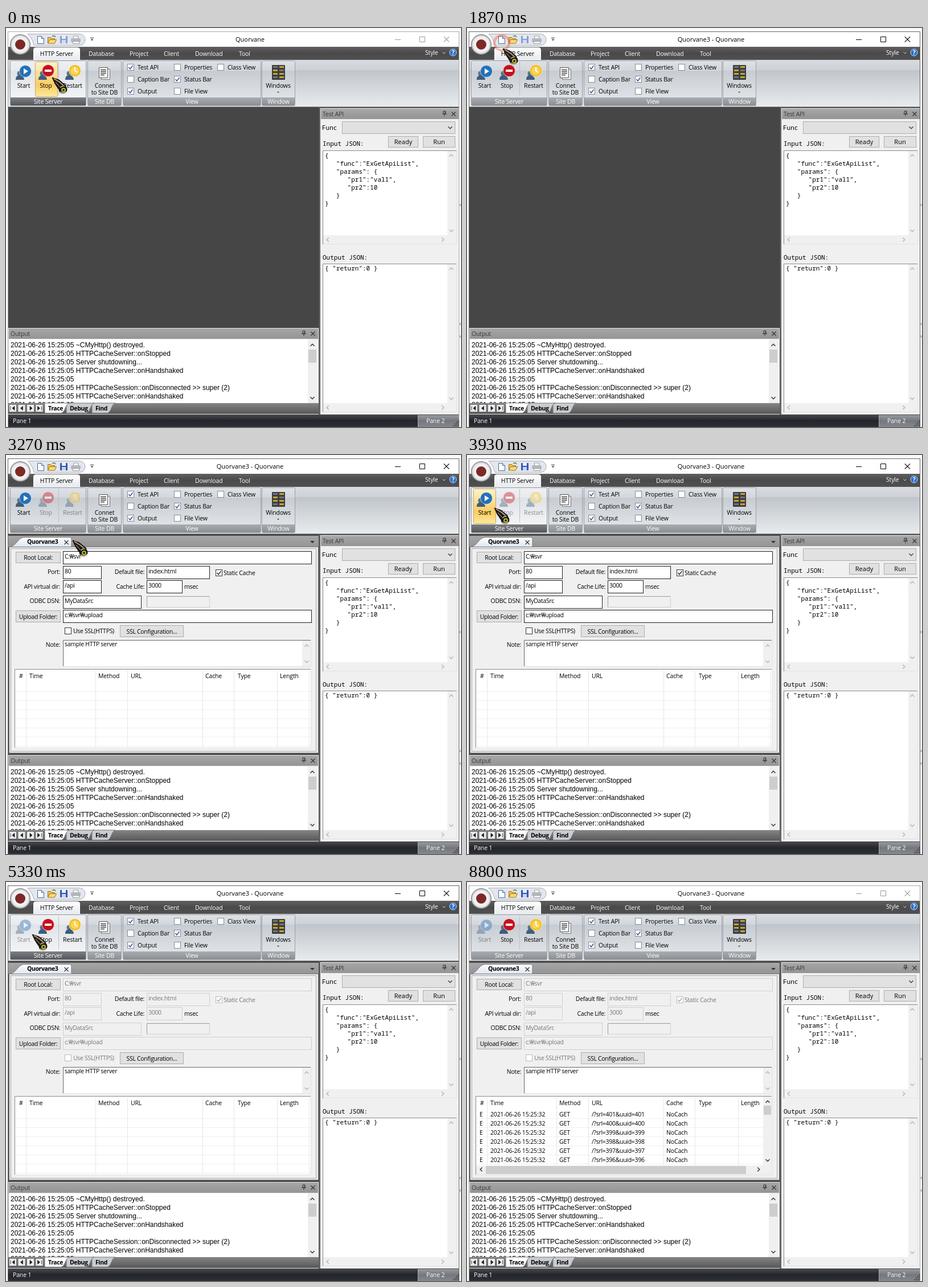
These frames come from a looping animation (799x701 px, 9 s). An HTML page:

```html
<!DOCTYPE html>
<html lang="en">
<head>
<meta charset="utf-8">
<title>Server manager</title>
<style>
html, body { margin: 0; width: 100%; height: 100%; overflow: hidden; background: #fff; }
svg { display: block; width: 100%; height: 100%; }
text { font: 10.5px "Open Sans", "Noto Sans", sans-serif; letter-spacing: -.15px; fill: #000; white-space: pre; }
.f { letter-spacing: -.3px; }
.s { font-size: 11px; letter-spacing: 0; }
.m { font: 11px "Noto Sans Mono", "DejaVu Sans Mono", monospace; letter-spacing: 0; }
.a { font: 12px "Liberation Sans", Arial, sans-serif; letter-spacing: 0; }
.b { font-weight: 700; letter-spacing: -.4px; }
.w { fill: #fff; }
.g { fill: #383838; }
.c { text-anchor: middle; }
.e { text-anchor: end; }
.edit { fill: #fff; stroke: #222; }
.off .edit { fill: #f0f0f0; stroke: #cfcfcf; }
.off .val { fill: #777; }
.off .box { stroke: #bbb; }
.off .tick { stroke: #aaa; }
.bare .soft { stroke: none; }
#options .box { stroke: #868c96; }
#options .tick { stroke: #41539a; }
</style>
</head>
<body>
<svg id="stage" viewBox="0 0 799 701" preserveAspectRatio="none"></svg>
<script>
const LOOP = 9000, STEP = 200 / 3;
const APP = "Quorvane", DOC = APP + "3";

// Markup helpers
const text = (x, y, s, cls = "") =>
  `<text x="${x}" y="${y}" class="${cls}">${s.replace(/&/g, "&amp;").replace(/>/g, "&gt;")}</text>`;
const rect = (x, y, w, h, fill, more = "") =>
  `<rect x="${x}" y="${y}" width="${w}" height="${h}" fill="${fill}" ${more}/>`;
const frame = (x, y, w, h, fill, stroke, more = "") =>
  rect(x + .5, y + .5, w - 1, h - 1, fill, `stroke="${stroke}" ${more}`);
const path = (d, fill, stroke = "none", w = 1, more = "") =>
  `<path d="${d}" fill="${fill}" stroke="${stroke}" stroke-width="${w}" ${more}/>`;
const line = (d, stroke, w = 1, more = "") => path(d, "none", stroke, w, more);
const disc = (x, y, r, fill, more = "") => `<circle cx="${x}" cy="${y}" r="${r}" fill="${fill}" ${more}/>`;
const group = (id, body) => `<g id="${id}">${body}</g>`;
const grad = (id, ...stops) =>
  `<linearGradient id="${id}" x2="0" y2="1">${stops.map((c, i) =>
    `<stop offset="${i / (stops.length - 1)}" stop-color="${c}"/>`).join("")}</linearGradient>`;
// Glossy: a short upper band, then a longer lower one
const gloss = (id, a, b, c, d) =>
  `<linearGradient id="${id}" x2="0" y2="1">${[[0, a], [.22, b], [.22, c], [1, d]].map(([o, col]) =>
    `<stop offset="${o}" stop-color="${col}"/>`).join("")}</linearGradient>`;

// Small widgets
const cross = (x, y, r, col = "#333", w = 1.2) =>
  line(`M${x - r} ${y - r}l${2 * r} ${2 * r}m0 ${-2 * r}l${-2 * r} ${2 * r}`, col, w);
const pin = (x, y) => line(`M${x - 2} ${y - 4}h4v5h-4zm-2 5h8m-4 0v4m1 -8v3`, "#333");
const arrow = (x, y, r = 3, col = "#333") => path(`M${x - r} ${y - r / 2}h${2 * r}l${-r} ${r}z`, col);
const turns = { up: 180, down: 0, left: 90, right: -90 };
const chevron = (x, y, dir, col = "#b5b5b5") =>
  line("M-3.5 -1.8L0 1.8L3.5 -1.8", col, 1.4, `transform="translate(${x} ${y}) rotate(${turns[dir]})"`);
const button = (x, y, w, h, label, cls = "f") =>
  frame(x, y, w, h, "#e1e1e1", "#adadad") + text(x + w / 2, y + h / 2 + 4, label, "c " + cls);
const check = (x, y, on) => frame(x - 6, y - 6, 12, 12, "#fff", "#333", 'class="box"') +
  (on ? line(`M${x - 3.5} ${y}l2.5 3l4.5 -6`, "#333", 1.5, 'class="tick"') : "");
const caption = (x, y, w, s) => rect(x, y, w, 18, "url(#cap)") + text(x + 3, y + 13, s, "g") +
  pin(x + w - 25, y + 8) + cross(x + w - 9, y + 9, 3.5);

const defs = `<defs>
  ${grad("cap", "#a6a6a6", "#949494")}
  ${grad("bar", "#606060", "#4a4a4a", "#505050")}
  ${gloss("ribbon", "#d8dbe0", "#cdd1d7", "#c0c5cc", "#e8ecee")}
  ${gloss("grp", "#dee1e5", "#d3d7dc", "#c7ccd2", "#e6e9ec")}
  ${gloss("grpHot", "#eef0f2", "#e8eaed", "#dfe2e6", "#f8f9fa")}
  ${grad("foot", "#a9acb0", "#8b8e92")}
  ${grad("footHot", "#7c7f83", "#55585b")}
  ${grad("hot", "#fdf1cb", "#fce19a", "#f9cd62", "#fdea9f")}
  ${grad("tab", "#ffffff", "#e6e9ee")}
  ${grad("doctab", "#ffffff", "#dde6f2")}
  ${grad("status", "#484a4e", "#24262b", "#2c2f34")}
  ${grad("pane", "#97999e", "#74777d", "#85888d")}
  ${grad("dock", "#858585", "#575757")}
  <radialGradient id="orb"><stop offset="0" stop-color="#fff"/><stop offset=".8" stop-color="#eeeeef"/><stop offset="1" stop-color="#aaacb1"/></radialGradient>
  <clipPath id="log"><rect x="5" y="547" width="525" height="112"/></clipPath>
</defs>`;

function titleBar() {
  return rect(0, 0, 799, 701, "#fafafa") + rect(3, 6, 793, 695, "#5a5a5a") + rect(4, 7, 791, 27, "#fff") +
    path("M3.5 701V6.5H795.5V701", "none", "#999", 1, 'id="edge"') +
    `<text id="title" x="428.5" y="24" class="s c"></text>` +
    group("sys", line("M683 20.5h10M726.5 15.5h9v9h-9z", "currentColor") + cross(773.5, 20, 4.7, "currentColor", 1.1)) +
    path("M38 10.5H129A10 10 0 0 1 129 30.5H49Q46 17 38 10.5Z", "#e3e7ee", "#a3abb8") +
    path("M55.5 14.5h7l4 4v9h-11z", "#fff", "#4a65a0") + path("M62.5 14.5v4h4", "#cddcf5", "#4a65a0") +
    path("M73.5 26.5v-10h5l1 2h6v3", "#f5c34c", "#9a7324") + path("M73.5 27l3 -6.5h12l-3 6.5z", "#ffd970", "#9a7324") +
    path("M81 15q4 -3 6 1", "none", "#4b7d38", 1.4) +
    group("save", rect(95, 14, 13, 13, "#3458b8", 'rx="1"') + rect(98, 14, 7, 5, "#eef3ff") + rect(98, 21, 7, 6, "#c7d3ee")) +
    path("M118.5 19v-5h8v5", "#fff", "#999") + rect(114, 18, 17, 7, "#b4b8be", 'rx="2"') + path("M117.5 23.5h11v4h-11z", "#fff", "#999") +
    line("M148 17.5h6", "#333") + arrow(151, 21, 2.5);
}

function tabBar() {
  const names = [["Database", 145], ["Project", 217], ["Client", 277], ["Download", 332], ["Tool", 409]];
  return rect(4, 33, 791, 23, "url(#bar)") +
    path("M48.5 56V38q0 -3.5 4 -3.5H125.5q4 0 4 3.5V56z", "url(#tab)", "#fff") +
    text(89, 49, "HTTP Server", "c") +
    names.map(([s, x]) => text(x, 49, s, "w")).join("") +
    text(736, 47, "Style", "w") + line("M766.5 42.5l2.5 2.5l2.5 -2.5", "#ddd") +
    disc(785, 43, 6, "#2a6fd0", 'stroke="#cfe0fa"') + text(785, 47, "?", "c b w") +
    disc(25, 29, 17.5, "url(#orb)", 'stroke="#777b82"') + disc(25, 29, 9, "#7d2926");
}

const person = x => disc(x, 80, 4.5, "#56718f") + path(`M${x - 7} 91q0 -8 7 -8t8 8z`, "#3f5d7d");
const badge = (x, y, fill, glyph) => person(x - 10) + disc(x, y, 10.5, fill, 'stroke="#fff" stroke-opacity=".55"') + glyph;

function ribbon() {
  const groups = [[8, 132, "Site Server"], [144, 58, "Site DB"], [206, 241, "View"], [450, 57, "Window"]];
  const boxes = [["Test API", 1, 0, 0], ["Caption Bar", 0, 0, 1], ["Output", 1, 0, 2],
    ["Properties", 0, 1, 0], ["Status Bar", 1, 1, 1], ["File View", 0, 1, 2], ["Class View", 0, 2, 0]];
  const colX = [219, 301, 377];
  let tiles = "";
  for (let i = 0; i < 8; i++) tiles += rect(469 + i % 2 * 11, 67 + (i >> 1) * 6, 8, 3, i % 3 ? "#c9a52c" : "#71747a");
  return rect(4, 56, 791, 83, "url(#ribbon)") + rect(4, 138, 791, 1, "#888") +
    groups.map(([x, w, s], i) => frame(x - 1, 57, w + 2, 80, "url(#grp)", "#9ca1a8", `rx="2" ${i ? "" : 'id="siteBody"'}`) +
      rect(x, 122, w, 14, "url(#foot)", i ? "" : 'id="siteFoot"') + text(x + w / 2, 133, s, "c w")).join("") +
    line("M92.5 60v58", "#bcc0c6") +
    group("startHot", frame(11, 59, 40, 62, "url(#hot)", "#c9a85c", 'rx="2"')) +
    group("stopHot", frame(51, 59, 40, 62, "url(#hot)", "#c9a85c", 'rx="2"')) +
    group("start", badge(34, 76, "#2471b8", path("M31 71l8 5l-8 5z", "#fff")) + text(31, 105, "Start", "c")) +
    group("stop", badge(74, 75, "#c5101c", rect(68, 73, 12, 4, "#fff")) + text(70, 105, "Stop", "c")) +
    group("restart", badge(121, 75, "#f2bd20", disc(121, 75, 7.5, "#fbd455") + line("M121 69v6l4 3", "#fff", 2)) + text(117, 105, "Restart", "c")) +
    path("M167.5 72.5h15v18h-15z", "#eee", "#777") + path("M163.5 69.5h15v18h-15z", "#fff", "#555") +
    line("M166 73.5h10m-10 3h10m-10 3h10m-10 3h7", "#444", 1.5) +
    text(173, 105, "Connet", "c") + text(173, 117, "to Site DB", "c") +
    group("options", boxes.map(([s, on, c, r]) =>
      check(colX[c], 69 + r * 21, on) + text(colX[c] + 12, 73 + r * 21, s)).join("")) +
    rect(467, 65, 23, 26, "#3b3e43", 'rx="1"') + tiles + text(478, 105, "Windows", "c") + arrow(478, 113, 2);
}

function jsonBox(y, h) {
  return frame(556, y, 236, h, "#f0f0f0", "#e3e3e3") + rect(557, y + 1, 218, h - 17, "#fff") +
    line(`M556.5 ${y + h}V${y + .5}H791`, "#8a8a8a") +
    chevron(782, y + 9, "up") + chevron(782, y + h - 24, "down") +
    chevron(565, y + h - 8, "left") + chevron(767, y + h - 8, "right");
}

function apiPanel() {
  const json = ["{", '   "func":"ExGetApiList",', '   "params": {', '      "pr1":"val1",', '      "pr2":10', "   }", "}"];
  const lines = json.map((s, i) => {
    const body = s.trimStart();
    return text(560 + (s.length - body.length) * 6.6, 228 + i * 14, body, "m");
  }).join("");
  return rect(552, 141, 243, 538, "#f0f0f0") + caption(553, 142, 242, "Test API") +
    text(556, 207, "Input JSON:", "m") + button(732, 190, 57, 20, "Run", "s") +
    group("apiBlank", frame(556, 215, 236, 165, "#f0f0f0", "#e3e3e3") + line("M556.5 379V215.5H791", "#999")) +
    group("apiFull", text(555, 179, "Func", "m") + frame(590, 164, 199, 22, "#e1e1e1", "#adadad") + chevron(780, 175, "down", "#444") +
      button(671, 190, 53, 20, "Ready", "s") + jsonBox(215, 165) + lines +
      text(556, 407, "Output JSON:", "m") + jsonBox(414, 261) + text(560, 426, '{ "return":0 }', "m"));
}

function outputPanel() {
  const log = ["~CMyHttp() destroyed.", "HTTPCacheServer::onStopped", "Server shutdowning...", "HTTPCacheServer::onHandshaked",
    "", "HTTPCacheSession::onDisconnected >> super (2)", "HTTPCacheServer::onHandshaked", ""];
  const tab = (x, w, s, fill) => path(`M${x} 659h${w}q-4 1 -7 9t-7 8.5H${x}z`, fill, "#777") + text(x + 6, 672, s, "b");
  const nav = ["M3 3v7M10 3l-4 3.5l4 3.5z", "M9 3l-4 3.5l4 3.5z", "M6 3l4 3.5l-4 3.5z", "M11 3v7M4 3l4 3.5l-4 3.5z"];
  return rect(4, 527, 545, 152, "#e4e4e4") + caption(5, 528, 543, "Output") + rect(5, 547, 543, 112, "#fff") +
    `<g clip-path="url(#log)">${log.map((s, i) => text(8, 561 + i * 15, "2021-06-26 15:25:05 " + s, "a")).join("")}</g>` +
    rect(530, 547, 17, 112, "#f0f0f0") + rect(531, 565, 14, 23, "#cdcdcd") +
    chevron(538, 557, "up", "#333") + chevron(538, 650, "down", "#333") +
    rect(4, 659, 545, 19, "url(#dock)") +
    tab(151, 41, "Find", "#c9ccd0") + tab(106, 49, "Debug", "#c9ccd0") + tab(68, 43, "Trace", "#fff") +
    nav.map((d, i) => frame(5 + i * 15.5, 661, 14, 14, "#eceef0", "#777") +
      path(d, "#222", "#222", .8, `transform="translate(${5 + i * 15.5} 661.5)"`)).join("");
}

function statusBar() {
  let grip = "";
  for (let i = 0; i < 4; i++) for (let j = 0; j <= i; j++) grip += rect(794 - j * 3, 689 + i * 3, 1.5, 1.5, "#222");
  return rect(4, 679, 791, 22, "url(#status)") + text(12, 694, "Pane 1", "w") +
    rect(724, 680, 71, 21, "url(#pane)") + line("M723.5 680v21", "#aaa") + text(738, 694, "Pane 2", "w") + grip;
}

function documentView() {
  const field = (x, y, w, s, cls = "") =>
    rect(x + .5, y + .5, w - 1, 22, "#fff", `class="edit ${cls}"`) + text(x + 3, y + 13, s, "f val");
  const label = (x, y, s) => text(x, y, s, "f e");
  const cols = [35, 157, 213, 345, 400, 476, 532];
  const heads = [["#", 23], ["Time", 41], ["Method", 162], ["URL", 219], ["Cache", 350], ["Type", 407], ["Length", 481]];
  const rules = [0, 1, 2, 3, 4, 5, 6].map(i => `M17 ${415.5 + i * 16}H535`).join("");
  const form = field(100, 169, 437, "C:₩svr") + field(100, 195, 68, "80", "soft") + field(247, 195, 111, "index.html") +
    field(100, 220, 68, "/api") + field(247, 220, 63, "3000", "soft") + field(100, 247, 138, "MyDataSrc") +
    field(100, 272, 437, "c:₩svr₩upload") +
    check(374, 207, 1) + text(382, 211, "Static Cache", "f val") + check(109, 309, 0) + text(118, 313, "Use SSL(HTTPS)", "f val");
  return rect(4, 141, 545, 384, "#535353") + rect(4, 142, 545, 20, "url(#cap)") +
    frame(5, 161, 544, 363, "#e9ebee", "#777") + frame(8, 164, 537, 357, "#f0f0f0", "#a5a9ae") +
    path("M7 161.5Q14 160 20 152T34 144.5H112q3 0 3 3V161.5z", "url(#doctab)", "#777") +
    text(37, 156, DOC, "b") + cross(106, 153.5, 3.5) + arrow(538, 153, 4) +
    button(17, 170, 79, 20, "Root Local:") + button(17, 273, 79, 21, "Upload Folder:") + button(200, 299, 112, 21, "SSL Configuration...") +
    label(95, 209, "Port:") + label(243, 209, "Default file:") + label(95, 235, "API virtual dir:") + label(243, 235, "Cache Life:") +
    label(95, 260, "ODBC DSN:") + label(95, 337, "Note:") + text(313, 235, "msec", "f") +
    frame(247, 248, 111, 20, "#f0f0f0", "#cfcfcf") + line("M247.5 267V248.5H357", "#999") + group("form", form) +
    frame(100, 325, 436, 47, "#fff", "#e3e3e3") + line("M100.5 371V325.5H535", "#666") + text(103, 336, "sample HTTP server", "f") +
    rect(520, 326, 15, 45, "#f0f0f0") + chevron(528, 335, "up") + chevron(528, 363, "down") +
    frame(15, 376, 521, 139, "#fff", "#e3e3e3") + line("M15.5 514V376.5H535", "#8a8a8a") +
    line(rules, "#efefef") + line(cols.map(x => `M${x + .5} 378V513`).join(""), "#e6e6e6") +
    heads.map(([s, x]) => text(x, 392, s)).join("") +
    group("rows", "") +
    group("bars", rect(520, 377, 15, 121, "#f0f0f0") + rect(16, 498, 519, 16, "#f0f0f0") +
      rect(521, 393, 13, 16, "#cdcdcd", 'id="thumb"') + rect(33, 499, 457, 14, "#cdcdcd") +
      chevron(528, 386, "up", "#333") + chevron(528, 489, "down", "#333") +
      chevron(25, 505, "left", "#333") + chevron(512, 505, "right", "#333"));
}

function rowsMarkup(last, sec) {
  let out = "";
  for (let i = 0; i < 6; i++) {
    const y = 412 + i * 16, n = last - i;
    out += text(22, y, "E") + text(41, y, "2021-06-26 15:25:" + sec) + text(162, y, "GET") +
      text(219, y, `/?srl=${n}&uuid=${n}`, "f") + text(350, y, "NoCach");
  }
  return out;
}

const pointer = path("M0 0L12 4L24 14L19 22L11 20L5 11Z", "#1d1813", "#000", .8) +
  line("M3 2L13 8L20 14", "#b9a283", 2) + line("M6 8L14 17", "#7c6a52", 1.6) +
  disc(19, 21, 7.5, "#17170f") + disc(20, 22, 4, "#b9b332") + disc(20, 22, 1.8, "#15150c") +
  line("M14 25q5 5 11 0M14 18q3 -4 8 -3", "#ddd6bd", 1.2);

const stage = document.getElementById("stage");
stage.innerHTML = defs + titleBar() + tabBar() + ribbon() + rect(4, 139, 547, 388, "#464646") + line("M550.5 139V679", "#707070") +
  group("doc", documentView()) + outputPanel() + apiPanel() + statusBar() +
  [311, 520, 542].map(y => rect(797, y - 2, 1, 4, "#6f78b5")).join("") +
  `<circle id="ring" r="13" fill="none" stroke="#ec3d22" stroke-width="4.5"/>` + group("pointer", pointer);

const el = {};
stage.querySelectorAll("[id]").forEach(n => el[n.id] = n);
const show = (n, on) => n.setAttribute("display", on ? "inline" : "none");
const fade = (n, on, dim = .4) => n.setAttribute("opacity", on ? 1 : dim);

// Pointer path: time, x, y
const route = [[0, 81, 87], [67, 80, 85], [800, 61, 20], [1066, 61, 20], [1600, 61, 25], [1867, 63, 36], [2000, 72, 60],
  [2333, 174, 268], [2867, 186, 286], [3267, 117, 150], [3800, 68, 102], [3933, 48, 93], [4066, 48, 93],
  [4267, 30, 87], [4400, 30, 87], [4600, 37, 85], [4733, 43, 88], [5333, 46, 92], [LOOP, 46, 92]];
const clicks = [[1600, 61, 26], [4600, 37, 85]];

function pointerAt(t) {
  const i = Math.max(1, route.findIndex(p => p[0] >= t));
  const [t0, x0, y0] = route[i - 1], [t1, x1, y1] = route[i];
  const k = (t - t0) / (t1 - t0);
  return [x0 + (x1 - x0) * k, y0 + (y1 - y0) * k];
}

let rowKey = 0;
function draw(ms) {
  const t = Math.floor((ms + 4) / STEP) * STEP + .1;
  const [x, y] = pointerAt(t);
  const visible = t < 7530, active = t >= 1600 && visible;
  const open = t >= 1999, running = t >= 4866, busy = t >= 4666 && !running;
  const over = (l, top, r, b) => visible && x >= l && x <= r && y >= top && y <= b;

  el.title.textContent = t >= 1790 ? `${DOC} - ${APP}` : APP;
  el.sys.setAttribute("color", active ? "#000" : "#999");
  el.edge.setAttribute("stroke", active ? "#666" : "#aaa");
  fade(el.save, open, .5);

  fade(el.start, !running);
  fade(el.stop, !open || running);
  fade(el.restart, !open || running);
  show(el.startHot, !running && open && over(11, 59, 50, 121));
  show(el.stopHot, !open && over(51, 59, 90, 121));
  const hot = over(8, 58, 140, 136) ? "Hot" : "";
  el.siteBody.setAttribute("fill", `url(#grp${hot})`);
  el.siteFoot.setAttribute("fill", `url(#foot${hot})`);

  show(el.doc, open);
  el.form.setAttribute("class", running ? "off" : busy ? "bare" : "");
  show(el.apiFull, !busy);
  show(el.apiBlank, busy);

  const listed = t >= 7660, last = t >= 8795 ? 401 : 23;
  show(el.rows, listed);
  show(el.bars, listed);
  el.thumb.setAttribute("height", t >= 8595 ? 16 : 23);
  if (last !== rowKey) {
    rowKey = last;
    el.rows.innerHTML = rowsMarkup(last, last > 99 ? 32 : 31);
  }

  const hit = clicks.find(([at]) => t >= at && t < at + 390);
  show(el.ring, hit);
  if (hit) {
    el.ring.setAttribute("cx", hit[1]);
    el.ring.setAttribute("cy", hit[2]);
    el.ring.setAttribute("opacity", 1 - (t - hit[0]) / 400);
  }
  show(el.pointer, visible);
  el.pointer.setAttribute("transform", `translate(${Math.round(x)} ${Math.round(y)})`);
}

const begin = performance.now();
function tick() {
  draw((performance.now() - begin) % LOOP);
  requestAnimationFrame(tick);
}
tick();
</script>
</body>
</html>
```
